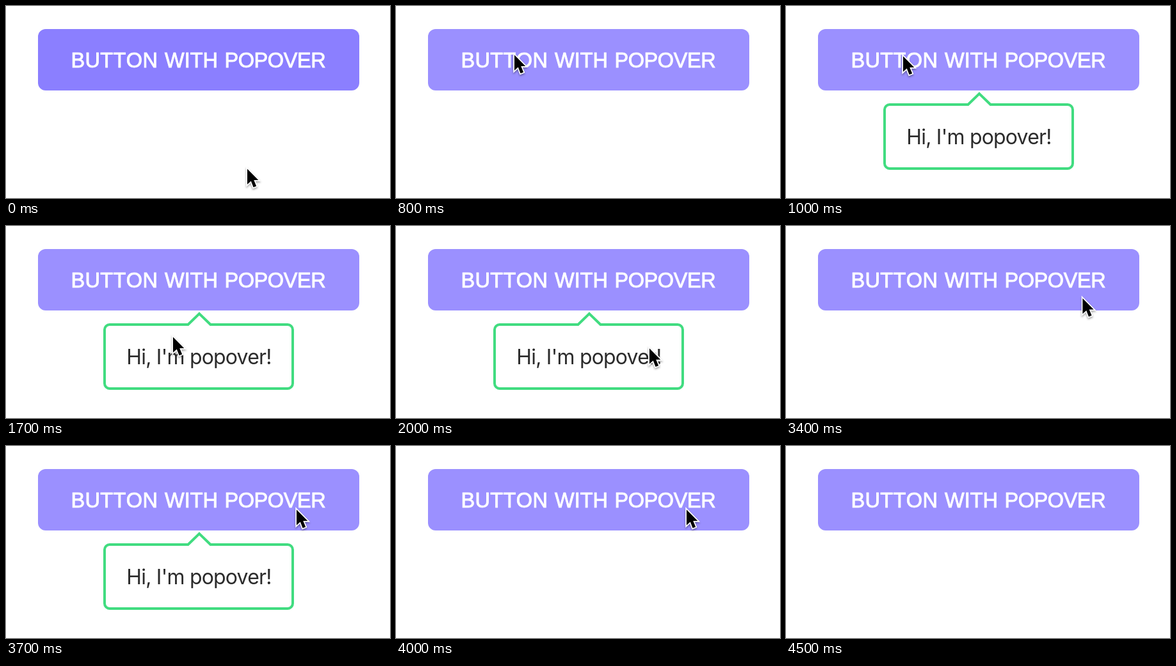
These frames come from a looping animation (600 px wide and 300 px high, 4700 ms). An HTML page:

```html
<!DOCTYPE html>
<html lang="en">
<head>
<meta charset="utf-8">
<title>Button with popover</title>
<style>
  html, body { margin: 0; width: 100%; height: 100%; overflow: hidden; background: #fff; }
  svg { display: block; width: 100%; height: 100%; }
  .label {
    font: 32.5px "Liberation Sans", Arial, sans-serif;
    font-kerning: none;
    fill: #fff; stroke: #fff; stroke-width: .9;
  }
  .message {
    font: 32px Inter, sans-serif;
    letter-spacing: -.8px;
    text-anchor: middle;
    fill: #2b2b2b;
  }
  .arrow {
    stroke: #fff; stroke-width: 3.4; paint-order: stroke;
    filter: drop-shadow(0 2px 1.5px rgba(0, 0, 0, .35));
  }
</style>
</head>
<body>
<svg viewBox="0 0 600 300">
  <rect id="button" x="50" y="36" width="502" height="96" rx="12"/>
  <g class="label">
    <text x="101.4" y="96.4" letter-spacing=".4">BUTTON</text>
    <text x="248" y="96.4">WITH</text>
    <text x="341.4" y="96.4" letter-spacing="-.4">POPOVER</text>
  </g>
  <g id="popover">
    <path d="M162 154H284.5L302 137 319.5 154H440a8 8 0 0 1 8 8V246a8 8 0 0 1-8 8H162a8 8 0 0 1-8-8V162a8 8 0 0 1 8-8Z"
          fill="#fff" stroke="#41dc80" stroke-width="4"/>
    <text class="message" x="301.5" y="216">Hi, I'm popover!</text>
  </g>
  <g id="pointer">
    <path class="arrow" d="M0 0V24.3L5.8 19 9.6 28.8 14.2 26.9 10.3 17.6H17.3Z"/>
    <circle id="ring" cx="-.5" cy="-.5" r="43.3" fill="none" stroke="#000" stroke-width="2.6"/>
  </g>
</svg>
<script>
  const LOOP = 4700, STEP = 100;
  const $ = id => document.getElementById(id);
  const button = $('button'), popover = $('popover'), pointer = $('pointer'), ring = $('ring');

  const smooth = u => u * u * (3 - 2 * u);
  const accelerate = u => u * u;

  // Each move: start, end, target point, easing
  const home = [377, 254.5];
  const moves = [
    [100, 800, [185, 76.5], smooth],
    [800, 900, [183, 78.5], smooth],
    [1100, 1700, [261, 173.5], smooth],
    [1700, 2300, [531, 209], smooth],
    [2900, 3540, [454, 99.5], smooth],
    [4200, 4400, [467, 255], accelerate]
  ];

  // Active periods in ms
  const hovered = [[600, 2100], [3300, LOOP]];
  const opened = [[1000, 2700], [3700, 4000]];
  const pressed = [[900, 1000], [2500, 2700], [3600, 3700], [3900, 4000]];
  const present = [[0, 4500]];

  const during = (spans, t) => spans.some(([a, b]) => t >= a && t < b);
  const show = (el, on) => el.setAttribute('display', on ? 'inline' : 'none');

  function position(t) {
    let from = home;
    for (const [start, end, to, ease] of moves) {
      if (t < start) break;
      if (t < end) {
        const k = ease((t - start) / (end - start));
        return from.map((v, i) => v + (to[i] - v) * k);
      }
      from = to;
    }
    return from;
  }

  function render(time) {
    const t = Math.floor((time % LOOP) / STEP) * STEP;
    button.setAttribute('fill', during(hovered, t) ? '#9b90ff' : '#8b7fff');
    show(popover, during(opened, t));
    show(ring, during(pressed, t));
    show(pointer, during(present, t));
    pointer.setAttribute('transform', `translate(${position(t)})`);
  }

  const begin = performance.now();
  function tick() {
    render(performance.now() - begin);
    requestAnimationFrame(tick);
  }
  tick();
</script>
</body>
</html>
```
